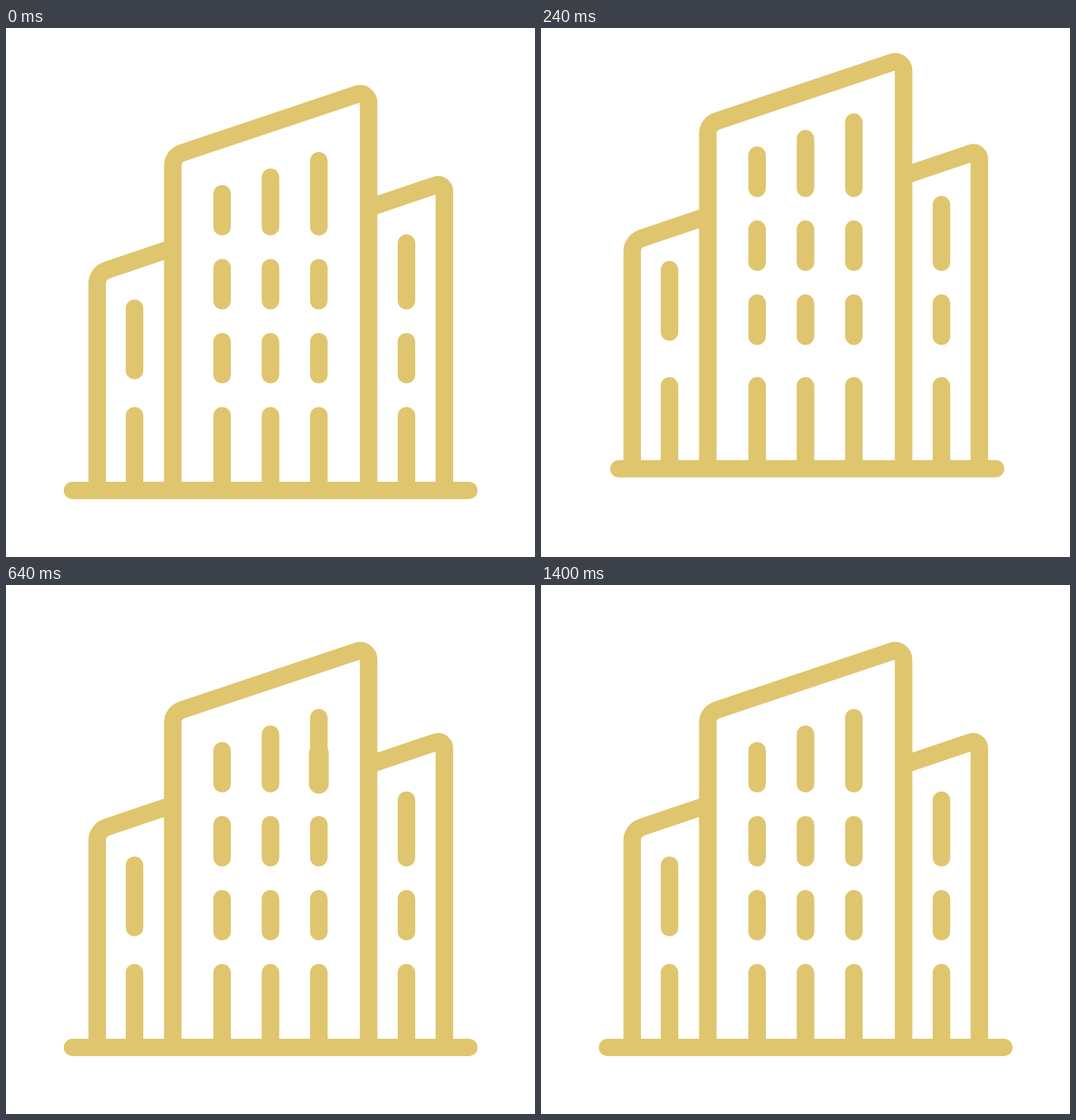
An HTML page that plays this animation: 640x640 px, repeating every 1.48 s.

```html
<!DOCTYPE html>
<html lang="en">
<head>
<meta charset="utf-8">
<title>Buildings</title>
<style>
  html, body { margin: 0; width: 100%; height: 100%; overflow: hidden; background: #fff; }
  svg { display: block; width: 100vw; height: 100vh; }
</style>
</head>
<body>
<svg viewBox="0 0 640 640" fill="none" stroke="#dfc56e" stroke-width="21.2" stroke-linecap="round">
  <path id="walls" stroke-linecap="butt"/>
  <line id="ground"/>
  <g id="panes"></g>
  <g id="glow" stroke-width="24"></g>
</svg>
<script>
const LOOP = 1480, STEP = 40;
const UP = 200, DOWN = 400, REST = 565;   // jump, squash, settle
const HALF = 180;                         // time to draw or erase one highlight
const FLOOR = 559.5, DOOR = 469;          // ground line, top of the lowest windows
const PANE = 40, GAP = 49.5;

const byId = id => document.getElementById(id);
const clamp = x => Math.min(1, Math.max(0, x));
const ease = x => { x = clamp(x); return x * x * (3 - 2 * x); };

function addLine(parent) {
  const el = document.createElementNS("http://www.w3.org/2000/svg", "line");
  return byId(parent).appendChild(el);
}

function setLine(el, x1, y1, x2, y2) {
  Object.entries({ x1, y1, x2, y2 }).forEach(([k, v]) => el.setAttribute(k, v));
}

const windows = [];
function addWindow(x, top, bottom, start) {
  windows.push({ x, top, bottom, start, pane: addLine("panes"), glow: addLine("glow") });
}

// Side windows and doors light up from the lowest to the highest.
const sideStart = top => 868 - 0.32 * top;

// The tower lights up like a checkerboard: one half sweeps diagonally, the other follows.
function towerStart(col, row) {
  return (col + row) % 2 ? 858 + 44 * row * row : 555 + 48 * (row + 2 - col);
}

// The first window has its own height; the rest repeat evenly down to the door.
function addColumn(x, top, bottom, startOf) {
  for (let row = 0; top < DOOR - PANE / 2; row++) {
    addWindow(x, top, bottom, startOf(top, row));
    top = bottom + GAP;
    bottom = top + PANE;
  }
  addWindow(x, DOOR, 0, sideStart(DOOR));
}

addColumn(155.5, 339, 414.5, sideStart);
for (let col = 0; col < 3; col++) {
  addColumn(261.5 + 58.5 * col, 200.5 - 20 * col, 240.5, (top, row) => towerStart(col, row));
}
addColumn(484.5, 260.3, 330, sideStart);

// 0 -> high -> low -> 0
function bounce(t, high, low) {
  if (t < UP) return high * ease(t / UP);
  if (t < DOWN) return high + (low - high) * ease((t - UP) / (DOWN - UP));
  return low * (1 - ease((t - DOWN) / (REST - DOWN)));
}

function drawWalls(dy, base) {
  const y = v => v + dy;
  byId("walls").setAttribute("d",
    `M201.8 ${base}V${y(166.4)}A16 16 0 0 1 212.7 ${y(151.2)}` +
    `L424.9 ${y(80.1)}A10.5 10.5 0 0 1 438.7 ${y(90.1)}V${base}` +
    `M110.3 ${base}V${y(309)}A17 17 0 0 1 121.9 ${y(293)}L201.8 ${y(266)}` +
    `M438.7 ${y(217.6)}L520.4 ${y(190)}A7.5 7.5 0 0 1 530.3 ${y(197.1)}V${base}`);
}

function draw(t) {
  const base = FLOOR + bounce(t, -29.3, 0);
  const shift = bounce(t, -56, 35);
  const doorShift = bounce(t, -44.8, 38.6);

  drawWalls(bounce(t, -46.2, 27), base);
  setLine(byId("ground"), 80.5 + bounce(t, 16.5, -9), base, 560 + bounce(t, -12.5, 12), base);

  for (const { x, top, bottom, start, pane, glow } of windows) {
    const a = top + (bottom ? shift : doorShift);
    const b = bottom ? bottom + shift : base - 3;
    setLine(pane, x, a, x, b);

    const head = ease((t - start) / HALF);
    const tail = ease((t - start - HALF) / HALF);
    const on = head > 0.01 && tail < 0.99;
    glow.style.display = on ? "" : "none";
    if (on) setLine(glow, x, b + (a - b) * head, x, b + (a - b) * tail);
  }
}

function tick() {
  const t = performance.now() % LOOP;
  draw(Math.floor(t / STEP) * STEP);
  requestAnimationFrame(tick);
}
tick();
</script>
</body>
</html>
```
